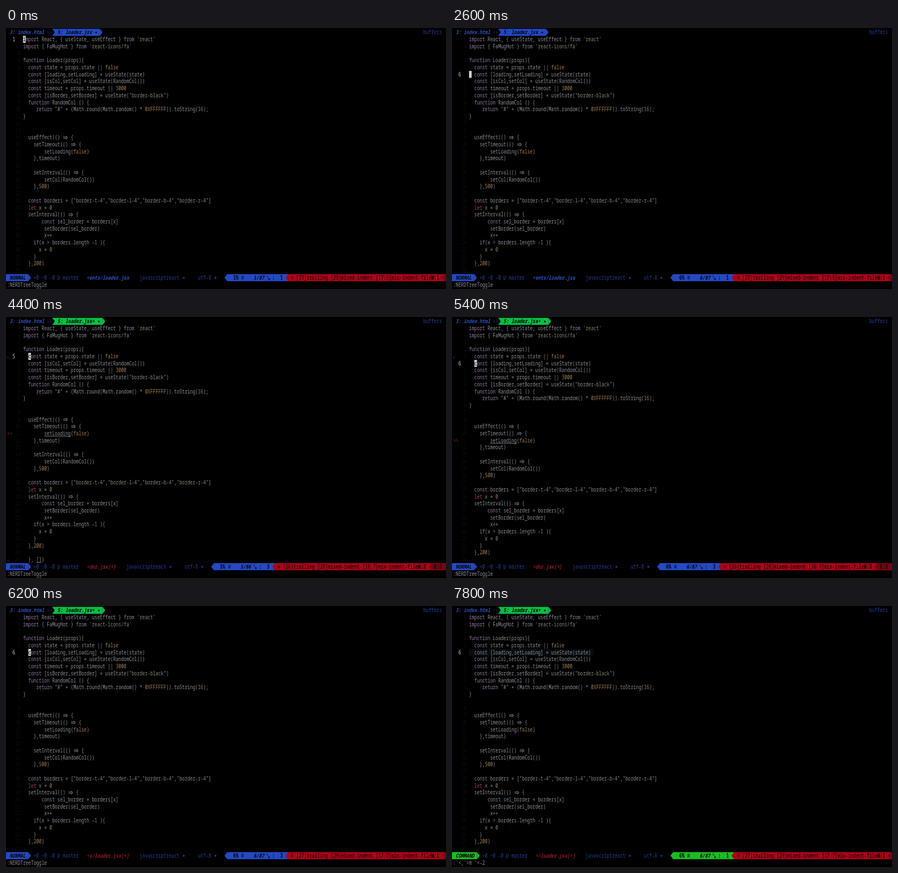
Recreate the animation shown at these times as an HTML page with a canvas. Size 800 by 474 pixels, loop 8000 ms.

```html
<!DOCTYPE html>
<html lang="en">
<head>
<meta charset="utf-8">
<title>Editing loader.jsx</title>
<style>
html, body { margin: 0; width: 100%; height: 100%; overflow: hidden; background: #000; }
canvas { display: block; width: 100vw; height: 100vh; }
</style>
</head>
<body>
<canvas id="screen"></canvas>
<script>
const WIDTH = 800, HEIGHT = 474, LOOP = 8000;
const CELL = 4.82, ROW = 12.73, LEFT = 2, TOP = 1.5, CODE_COL = 6, CODE_ROWS = 34;
const STATUS_ROW = 35, COMMAND_ROW = 36;
const FONT = '"Noto Sans Mono", "DejaVu Sans Mono", monospace';
const BLUE = '#2449c4', TAB_GREEN = '#08c044', GREEN = '#1cbc22', ORANGE = '#c8741c';
const RED = '#ac0418', DARK_RED = '#780410';
const DIM_BLUE = '#223f9c', INK = '#02040a', PLAIN = '#8e8f97', LIGHT = '#cfd0d6', SIGN = '#5a5a52';

const SOURCE = `import React, { useState, useEffect } from 'react'
import { FaMugHot } from 'react-icons/fa'

function Loader(props){
  const state = props.state || false
  const [loading,setLoading] = useState(state)
  const [isCol,setCol] = useState(RandomCol())
  const timeout = props.timeout || 3000
  const [isBorder,setBorder] = useState("border-black")
  function RandomCol () {
     return "#" + (Math.round(Math.random() * 0XFFFFFF)).toString(16);
}


  useEffect(() => {
    setTimeout(() => {
        setLoading(false)
    },timeout)

    setInterval(() => {
        setCol(RandomCol())
    },500)

  const borders = ["border-t-4","border-l-4","border-b-4","border-r-4"]
  let x = 0
  setInterval(() => {
       const sel_border = borders[x]
        setBorder(sel_border)
        x++
    if(x > borders.length -1 ){
      x = 0
    }
  },200)

  }, [])`.split('\n');
const SHORTENED = SOURCE.filter((_, i) => i !== 5);

const TOKENS = /(\s+)|("[^"]*"|'[^']*')|\b(import|from|const|function|return|if)\b|\b(let)\b|\b(0X[0-9A-F]+|\d+|false)\b|=>|[A-Za-z_]+|[^\sA-Za-z_"']/g;
const TOKEN_COLORS = [, , '#85897a', '#917ba0', '#b03c58', '#a87c56'];

// Each entry changes part of the editor state from its time onwards.
const TIMELINE = [
  [0, { line: 1, col: 1, file: '<ents/loader.jsx', mode: 'NORMAL', color: BLUE, command: ':NERDTreeToggle', warnings: ['27', '29', '17:5'] }],
  [1200, { line: 2 }],
  [1600, { line: 3, col: 0 }],
  [2000, { line: 4, col: 1 }],
  [2400, { line: 5 }],
  [2600, { line: 6 }],
  [3600, { col: 3, deleted: true, modified: true, file: '<s/loader.jsx[+]' }],
  [4000, { lint: true, file: '<der.jsx[+]', warnings: ['26', '28', '16:7'] }],
  [4200, { line: 5 }],
  [5000, { line: 6, deleted: false }],
  [6200, { lint: false, file: '<s/loader.jsx[+]', warnings: ['27', '29', '17:7'] }],
  [7400, { mode: 'V-LINE', color: ORANGE, selected: true, command: '' }],
  [7800, { mode: 'COMMAND', color: GREEN, col: 1, file: '</loader.jsx[+]', command: ":'<,'>m '<-2" }],
];

const canvas = document.getElementById('screen');
const ctx = canvas.getContext('2d');
const colX = col => LEFT + col * CELL;
const rowY = row => TOP + row * ROW;

function write(text, col, row, color, style = '', size = 10) {
  ctx.font = `${style} ${size}px ${FONT}`;
  ctx.fillStyle = color;
  ctx.save();
  ctx.translate(colX(col), rowY(row) + 9.8);
  ctx.scale(CELL * size / 10 / ctx.measureText('0').width, 1);
  ctx.fillText(text, 0, 0);
  ctx.restore();
}

function block(from, to, row, color) {
  ctx.fillStyle = color;
  ctx.fillRect(colX(from), rowY(row), (to - from) * CELL, ROW);
}

// A one-cell triangle; direction 1 points right, -1 points left.
function arrow(col, row, color, direction) {
  const base = colX(direction > 0 ? col : col + 1), y = rowY(row);
  ctx.fillStyle = color;
  ctx.beginPath();
  ctx.moveTo(base, y);
  ctx.lineTo(base + direction * CELL, y + ROW / 2);
  ctx.lineTo(base, y + ROW);
  ctx.fill();
}

function dot(col, row, color) {
  ctx.fillStyle = color;
  ctx.beginPath();
  ctx.arc(colX(col) + 3, rowY(row) + 6.6, 1.6, 0, 7);
  ctx.fill();
}

function underline(col, length, row) {
  ctx.fillStyle = PLAIN;
  ctx.fillRect(colX(col), rowY(row) + 11.2, length * CELL, 0.8);
}

function strokePaths(col, row, color, paths) {
  ctx.strokeStyle = color;
  ctx.lineWidth = 0.9;
  ctx.beginPath();
  for (const points of paths) {
    points.forEach(([x, y], i) => ctx[i ? 'lineTo' : 'moveTo'](colX(col) + x, rowY(row) + y));
  }
  ctx.stroke();
}

const drawBranch = (col, row) =>
  strokePaths(col, row, DIM_BLUE, [[[1, 2], [1, 11], [4, 7], [4, 3]]]);

// "=>" is a two-cell ligature.
const drawFatArrow = (col, row) =>
  strokePaths(col, row, PLAIN, [[[0.8, 5.3], [7.8, 5.3]], [[0.8, 7.7], [7.8, 7.7]], [[5.6, 3.3], [8.8, 6.5], [5.6, 9.7]]]);

function drawTabs({ modified }) {
  const color = modified ? TAB_GREEN : BLUE, end = modified ? 36 : 35;
  write('3: index.html', 1, 0, '#2c50c0', 'italic bold');
  write('‹›', 15, 0, DIM_BLUE);
  block(17, end, 0, color);
  arrow(17, 0, '#000', 1);
  arrow(end, 0, color, 1);
  write('5: loader.jsx' + (modified ? '+' : ''), 19, 0, INK, 'italic bold');
  dot(end - 2, 0, INK);
  write('buffers', 157, 0, DIM_BLUE);
}

function drawCode(state) {
  const lines = state.deleted ? SHORTENED : SOURCE;
  if (state.selected) block(CODE_COL, CODE_COL + lines[state.line - 1].length + 1, state.line, '#070d0f');
  for (let row = 1; row <= CODE_ROWS; row++) {
    const text = lines[row - 1], distance = Math.abs(row - state.line);
    if (distance) write(String(distance).padStart(2), 3, row, '#0e0f13');
    else write(String(row), 2, row, LIGHT);

    for (const match of text.matchAll(TOKENS)) {
      const kind = match.findIndex((group, i) => i && group !== undefined);
      const col = CODE_COL + match.index;
      if (match[0] === '=>') drawFatArrow(col, row);
      else if (kind !== 1) write(match[0], col, row, TOKEN_COLORS[kind] || PLAIN);
    }
    if (text === '  }, [])') {
      write('⚠', 0, row, SIGN, '', 8);
      if (state.lint) underline(CODE_COL + 5, 2, row);
    }
    if (state.lint && text.includes(' setLoading(')) {
      write('>>', 0, row, '#7c2630');
      underline(CODE_COL + 8, 10, row);
    }
  }
  if (state.lint) write('⚠', 0, 5, SIGN, '', 8);

  if (!state.selected) {
    const offset = Math.max(state.col - 1, 0), col = CODE_COL + offset;
    block(col, col + 1, state.line, LIGHT);
    write(lines[state.line - 1][offset] || ' ', col, state.line, '#000');
  }
}

function drawStatus(state) {
  const row = STATUS_ROW, { color, mode } = state;
  const total = state.deleted ? 86 : 87;
  const extra = mode.length - 6, shift = state.lint ? -5 : 0;
  const put = (text, col, ink = INK, style = 'bold') => write(text, col + shift, row, ink, style);

  ctx.fillStyle = color;
  ctx.fillRect(0, rowY(row), colX(8 + extra), ROW);
  arrow(8 + extra, row, color, 1);
  write(mode, 1, row, INK, 'italic bold');
  write('+0 ~0 -0', 10 + extra, row, DIM_BLUE);
  drawBranch(19 + extra, row);
  write('master', 21 + extra, row, DIM_BLUE);
  write(state.file, 30 + extra, row, state.modified ? '#981620' : '#2c50c0', 'italic bold');
  put('javascriptreact', 50, DIM_BLUE, '');
  dot(66 + shift, row, DIM_BLUE);
  put('utf-8', 72, DIM_BLUE, '');
  dot(78 + shift, row, DIM_BLUE);

  arrow(82 + shift, row, color, -1);
  block(83 + shift, 106 + shift, row, color);
  put(Math.floor(state.line / total * 100) + '%', 85.3);
  write('☰', 88.3 + shift, row - 0.08, INK, 'bold', 7);
  put(`${state.line}/${total}`.padStart(4), 93, INK, 'italic bold');
  write('L', 98 + shift, row - 0.3, INK, 'bold', 6);
  write('N', 98.5 + shift, row + 0.08, INK, 'bold', 6);
  put(':', 100);
  put(String(state.col), 103);

  arrow(105 + shift, row, RED, -1);
  ctx.fillStyle = RED;
  ctx.fillRect(colX(106 + shift), rowY(row), WIDTH, ROW);
  const [trailing, mixed, file] = state.warnings;
  write('☰', 107 + shift, row - 0.08, INK, '', 7);
  put(`[${trailing}]trailing [${mixed}]mixed-indent [${file}]mix-indent-file`, 109, INK, '');
  put(state.lint ? 'W:2' : 'W:1', 160);
  arrow(164 + shift, row, DARK_RED, -1);
  ctx.fillStyle = DARK_RED;
  ctx.fillRect(colX(165 + shift), rowY(row), WIDTH, ROW);
  if (state.lint) write('E:2', 161, row, INK, 'bold');
}

function draw(now) {
  const time = now % LOOP;
  const state = Object.assign({}, ...TIMELINE.filter(([start]) => start <= time).map(entry => entry[1]));
  const ratio = window.devicePixelRatio || 1;
  if (canvas.width !== Math.round(WIDTH * ratio)) {
    canvas.width = Math.round(WIDTH * ratio);
    canvas.height = Math.round(HEIGHT * ratio);
  }
  ctx.setTransform(ratio, 0, 0, ratio, 0, 0);
  ctx.fillStyle = '#000';
  ctx.fillRect(0, 0, WIDTH, HEIGHT);
  drawTabs(state);
  drawCode(state);
  drawStatus(state);
  write(state.command, 0, COMMAND_ROW, PLAIN);
}

const start = performance.now();
function tick() {
  draw(performance.now() - start);
  requestAnimationFrame(tick);
}
tick();
</script>
</body>
</html>
```
